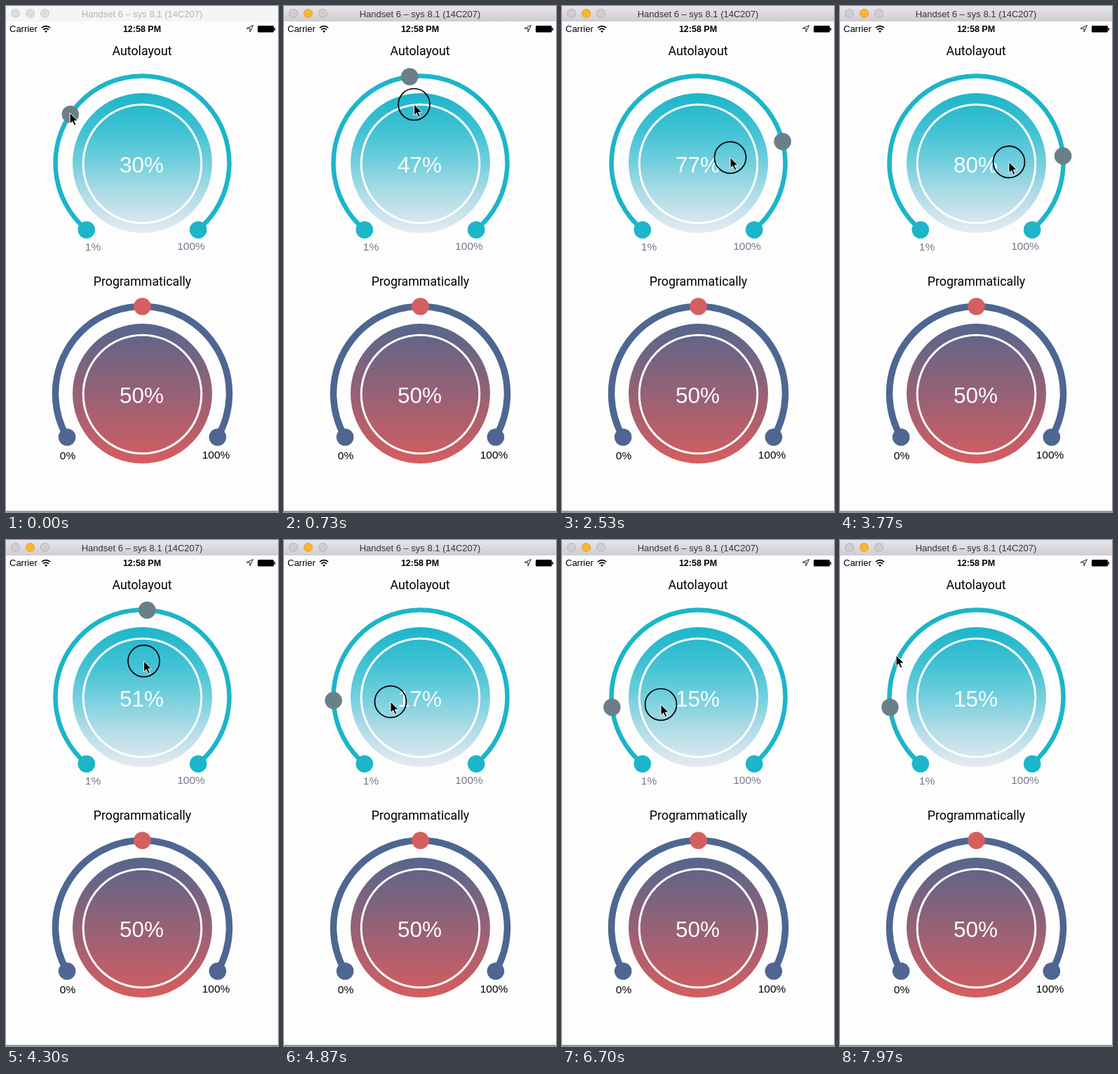
An HTML page that plays this animation: 388x720 px, repeating every 8 s.

```html
<!DOCTYPE html>
<html lang="en">
<head>
<meta charset="utf-8">
<title>Circular sliders</title>
<style>
html, body { margin: 0; width: 100%; height: 100%; overflow: hidden; background: #fdfdfd; }
svg { display: block; width: 388px; height: 720px; }
text { font-family: "Liberation Sans", Arial, sans-serif; font-size: 15.5px; text-anchor: middle; }
.heading { font: 17.8px Roboto, sans-serif; }
.value { font-size: 31.5px; fill: #fdfdfd; }
</style>
</head>
<body>
<svg viewBox="0 0 388 720">
  <defs>
    <linearGradient id="bar" x2="0" y2="1">
      <stop stop-color="#e7e5e9"/><stop offset="1" stop-color="#cfcdd3"/>
    </linearGradient>
    <linearGradient id="sea" x2="0" y2="1">
      <stop stop-color="#1eb5c9"/><stop offset=".27" stop-color="#40c2d4"/>
      <stop offset=".5" stop-color="#74cfdd"/><stop offset=".7" stop-color="#aadbe5"/>
      <stop offset="1" stop-color="#e7eaf1"/>
    </linearGradient>
    <linearGradient id="clay" x2="0" y2="1">
      <stop stop-color="#56668c"/><stop offset="1" stop-color="#d65d5f"/>
    </linearGradient>
  </defs>

  <rect id="titleBar" width="388" height="22"/>
  <g stroke-width="1">
    <circle class="light" cx="13.5" cy="10.5" r="6"/>
    <circle class="light" id="amber" cx="34.5" cy="10.5" r="6"/>
    <circle class="light" cx="55.5" cy="10.5" r="6"/>
  </g>
  <text id="title" x="194" y="15.5" style="font-size:13px">Handset 6 – sys 8.1 (14C207)</text>

  <text x="5" y="37" style="font-size:13px;text-anchor:start">Carrier</text>
  <g fill="none" stroke="#000" stroke-width="1.8">
    <path d="M51 31.2a8.5 8.5 0 0 1 12 0M53.2 33.8a5.2 5.2 0 0 1 7.6 0"/>
    <path d="M57 38l-2-2.2a3 3 0 0 1 4 0z" fill="#000" stroke="none"/>
  </g>
  <text x="194" y="37" style="font-size:12.5px;font-weight:bold">12:58 PM</text>
  <path d="M352.5 27.5l-9.5 4.5h5v5z" fill="none" stroke="#222"/>
  <rect x="359" y="28" width="23" height="9.5" rx="1.5"/>
  <rect x="382.5" y="31" width="1.5" height="4"/>

  <text class="heading" x="194" y="70">Autolayout</text>
  <text class="heading" x="194.5" y="398">Programmatically</text>
  <g id="dials"></g>
  <g fill="#77778c">
    <text x="124" y="348">1%</text><text x="264" y="347">100%</text>
  </g>
  <text x="88" y="645">0%</text><text x="299.5" y="644">100%</text>

  <rect y="718.5" width="388" height="1.5" fill="#858585"/>
  <g id="cursor">
    <circle id="touch" r="22.5" fill="none" stroke="#000" stroke-width="1.7"/>
    <path d="M0 0v15.5l3.6-3.3 2.6 6 2.6-1.1-2.5-5.9h4.9z" stroke="#fff"/>
  </g>
</svg>
<script>
const $ = id => document.getElementById(id);
const CX = 194.5, TRACK_RADIUS = 124;

const polar = (cy, degrees) => {
  const a = degrees * Math.PI / 180;
  return [CX + TRACK_RADIUS * Math.sin(a), cy - TRACK_RADIUS * Math.cos(a)];
};

// Adds a dial and returns a function that sets it to a fraction from 0 to 1.
function addDial({ cy, reach, width, color, knobColor, fill }) {
  const start = polar(cy, -reach), end = polar(cy, reach);
  const dot = ([x, y], c) => `<circle cx="${x}" cy="${y}" r="12.3" fill="${c}"/>`;
  const group = document.createElementNS("http://www.w3.org/2000/svg", "g");
  group.innerHTML = `
    <path d="M${start}A${TRACK_RADIUS} ${TRACK_RADIUS} 0 1 1 ${end}"
      fill="none" stroke="${color}" stroke-width="${width}"/>
    <circle cx="${CX}" cy="${cy}" r="99.5" fill="url(#${fill})"/>
    <circle cx="${CX}" cy="${cy + 1}" r="84.3" fill="none" stroke="#fdfdfd" stroke-width="3"/>
    ${dot(start, color)}${dot(end, color)}${dot(start, knobColor)}
    <text class="value" x="193.5" y="${cy + 13.5}"></text>`;
  $("dials").append(group);
  const knob = group.querySelector("circle:last-of-type"), label = group.querySelector("text");
  return fraction => {
    const [x, y] = polar(cy, (2 * fraction - 1) * reach);
    knob.setAttribute("cx", x);
    knob.setAttribute("cy", y);
    label.textContent = Math.max(1, Math.floor(fraction * 100 + 1e-6)) + "%";
  };
}

const setUpper = addDial({ cy: 223.5, reach: 140, width: 6.5, color: "#1cb5c9", knobColor: "#6b7f88", fill: "sea" });
const setLower = addDial({ cy: 551.5, reach: 120, width: 9.5, color: "#4e6691", knobColor: "#d45f60", fill: "clay" });
setLower(0.5);

// time, upper fraction, pointer x, pointer y
const KEYS = [
  [0, .3, 91, 152],
  [730, .4745, 185.5, 140],
  [1650, .63, 222, 170],
  [2530, .77, 240, 215.5],
  [3250, .88, 242, 240],
  [3770, .805, 241, 222],
  [4320, .5, 195, 172],
  [4870, .171, 152, 230],
  [5350, .01, 143, 284],
  [5630, .0202, 138.5, 280.5],
  [6600, .1545, 141, 234],
  [7000, .1545, 141, 234],
  [7970, .1545, 80, 164],
  [8000, .1545, 80, 164]
];
const LOOP = 8000, PRESS = 100, RELEASE = 7000;

const slope = (i, col) => KEYS[i] && KEYS[i + 1]
  ? (KEYS[i + 1][col] - KEYS[i][col]) / (KEYS[i + 1][0] - KEYS[i][0]) : 0;

// Flat at turning points, so the curve never overshoots a key.
function tangent(i, col) {
  if (i === 0) return slope(0, col);
  const a = slope(i - 1, col), b = slope(i, col);
  return a * b > 0 ? 2 * a * b / (a + b) : 0;
}

function sample(time, col) {
  const i = KEYS.findIndex((key, n) => n + 1 < KEYS.length && time < KEYS[n + 1][0]);
  const from = KEYS[i], to = KEYS[i + 1], span = to[0] - from[0];
  const u = (time - from[0]) / span, v = 1 - u;
  return v * v * (1 + 2 * u) * from[col] + u * u * (3 - 2 * u) * to[col]
    + u * v * span * (v * tangent(i, col) - u * tangent(i + 1, col));
}

function draw(time) {
  const active = time >= PRESS;
  $("titleBar").setAttribute("fill", active ? "url(#bar)" : "#f5f5f6");
  $("title").setAttribute("fill", active ? "#353538" : "#b3b3b6");
  document.querySelectorAll(".light").forEach(light => {
    light.setAttribute("fill", active ? "#cfcdcf" : "#dddddf");
    light.setAttribute("stroke", active ? "#b3b1b4" : "#cdcdd0");
  });
  if (active) {
    $("amber").setAttribute("fill", "#fdb52c");
    $("amber").setAttribute("stroke", "#dc9d34");
  }
  setUpper(sample(time, 1));
  $("cursor").setAttribute("transform", `translate(${sample(time, 2)} ${sample(time, 3)})`);
  $("touch").setAttribute("visibility", active && time < RELEASE ? "visible" : "hidden");
}

function frame() {
  draw(performance.now() % LOOP);
  requestAnimationFrame(frame);
}
frame();
</script>
</body>
</html>
```
